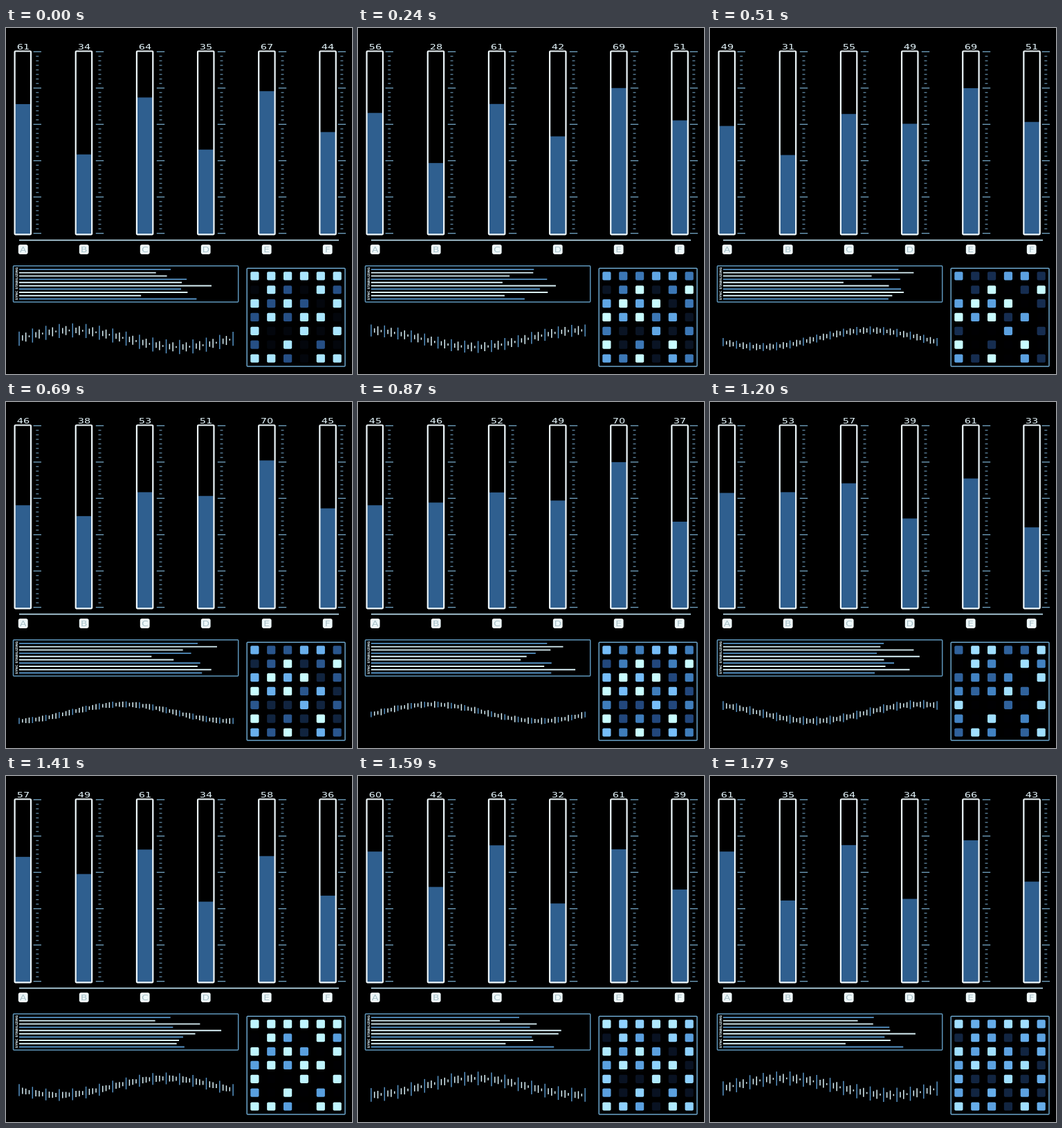
These frames come from a looping animation (500 px wide and 500 px high, 1800 ms). An HTML page with a canvas:

```html
<!DOCTYPE html>
<html lang="en">
<head>
<meta charset="utf-8">
<title>Control panel</title>
<style>
html, body { margin: 0; width: 100%; height: 100%; overflow: hidden; background: #000; }
canvas { display: block; width: 500px; height: 500px; }
</style>
</head>
<body>
<canvas id="stage" width="500" height="500"></canvas>
<script>
const ctx = document.getElementById('stage').getContext('2d');
const LOOP = 1800, STEP = 30;
const FACE = '"DejaVu Sans", Inter, sans-serif';
const BLUE = '#5592c4', PALE = '#d9f1f8';

// Every moving length is a cosine: mean, swing, time of its peak in ms, cycles per loop.
const wave = (t, mean, swing, peak, cycles = 1) =>
  mean + swing * Math.cos(2 * Math.PI * cycles * (t - peak) / LOOP);

const GAUGES = [
  t => wave(t, 53, 8, 1680),
  t => wave(t, 40.3, 12.4, 1160),
  t => wave(t, 58.3, 6.1, 1690),
  t => wave(t, 41.3, 9.3, 650),
  t => wave(t, 65.7, 5.5, 480) + wave(t, 0, 2.3, 900, 2),
  t => wave(t, 41.9, 9.5, 300) + wave(t, 0, 1.7, 450, 2)
];

const LINES = [
  [255, 22, 700], [255, 50, 700], [257, 38, 1150], [258, 18, 400], [252, 60, 1360],
  [266, 31, 1790], [266, 15, 750], [265, 15, 500], [255, 60, 920], [262, 24, 760, 2]
];

// Heights of the four ticks that repeat along the sine.
const TICKS = [[14.3, 6.2, 1730], [7, 2, 1480], [9, 4.3, 100], [6, 3.5, 950]];

// Four groups of cells, each flickering between a few brightness levels.
const CELLS = ['XYYXXY', 'NYZNYZ', 'XZXZNY', 'ZXZYXN', 'YNNXNY', 'ZNYNZN', 'XYZNXY'];
const BEATS = [0, 240, 510, 870, 1200, 1410, 1770, LOOP];
const LEVELS = {
  X: [0.9, 0.62, 0.6, 0.72, 0.35, 0.97, 0.87],
  Y: [0.9, 0.43, 0.16, 0.45, 0.87, 0.97, 0.65],
  Z: [0.28, 1, 1, 1, 0.47, 0.59, 0.6],
  N: [0.02, 0.07, 0, 0.25, 0, 0, 0.13]
};
const RAMP = [[0, 0, 2], [34, 71, 124], [70, 138, 203], [124, 196, 255], [200, 252, 255]];

const mix = (a, b, u) => a + (b - a) * u;

function level(list, t) {
  const i = BEATS.findIndex(b => b > t) - 1;
  const u = (t - BEATS[i]) / (BEATS[i + 1] - BEATS[i]);
  return mix(list[i], list[(i + 1) % list.length], u);
}

function shade(v) {
  const at = v * (RAMP.length - 1);
  const i = Math.min(Math.floor(at), RAMP.length - 2);
  return `rgb(${RAMP[i].map((c, k) => Math.round(mix(c, RAMP[i + 1][k], at - i)))})`;
}

function line(x1, y1, x2, y2, color, width) {
  ctx.strokeStyle = color;
  ctx.lineWidth = width;
  ctx.beginPath();
  ctx.moveTo(x1, y1);
  ctx.lineTo(x2, y2);
  ctx.stroke();
}

function frame(x, y, w, h, color, width) {
  ctx.strokeStyle = color;
  ctx.lineWidth = width;
  ctx.beginPath();
  ctx.roundRect(x, y, w, h, 1);
  ctx.stroke();
}

function tile(x, y, size, r, color) {
  ctx.fillStyle = color;
  ctx.beginPath();
  ctx.roundRect(x - size / 2, y - size / 2, size, size, r);
  ctx.fill();
}

function label(text, x, y, font, color, wide = 1, turn = 0) {
  ctx.save();
  ctx.translate(x, y);
  ctx.rotate(turn);
  ctx.scale(wide, 1);
  ctx.font = `${font} ${FACE}`;
  ctx.fillStyle = color;
  ctx.textAlign = 'center';
  ctx.fillText(text, 0, 0);
  ctx.restore();
}

function drawGauge(gauge, n, t) {
  const x = 24.3 + n * 88.15, mid = 24.7 + n * 88;
  const ruler = mid + (n % 5 ? 22.8 : 20.6);
  const top = 268.6 - 2.63 * gauge(t);
  ctx.fillStyle = '#2f5f8f';
  ctx.fillRect(x - 11, top, 22, 298 - top);
  frame(x - 11.7, 33.5, 23.4, 264.8, '#eef8fc', 2.2);

  for (let k = 0; k <= 40; k++) {
    const half = k % 8 ? 2 : 5.7;
    const y = 34.3 + k * 6.56;
    line(ruler - half, y, ruler + half, y, k % 8 ? '#587f99' : '#6c9bb8', 1.4);
  }
  // The reading trails the fill by one step.
  label(Math.round(gauge(t - STEP)), mid + 0.2, 30.8, '10.5px', '#e4f5fb', 1.38);
  tile(mid, 320, 13.8, 2.8, '#eef9fb');
  label('ABCDEF'[n], mid, 323.6, '10px', '#a9c0c8', 1.38);
}

function drawSync(t) {
  frame(10.5, 343.7, 325.2, 52.3, '#5e96bb', 1.5);
  LINES.forEach((spec, n) => {
    const y = 348.9 + n * 4.73;
    line(19, y, wave(t, ...spec), y, n % 3 ? PALE : BLUE, 1.9);
  });
  label('SYNC STABILIZING', 17.3, 369.5, 'bold 4.6px', '#dff3fa', 1, -Math.PI / 2);
}

function drawSine(t) {
  for (let k = 0; k <= 64; k++) {
    const x = 19 + k * 4.83;
    const y = 449 - 12 * Math.sin(2 * Math.PI * ((x - 19) / 310 + 2 * t / LOOP));
    const half = wave(t, ...TICKS[k % 4]) / 2;
    line(x, y - half, x, y + half, k % 4 ? PALE : BLUE, 1.5);
  }
}

function drawMatrix(t) {
  frame(348.2, 347.2, 141.8, 141.8, '#6ba5cb', 1.5);
  CELLS.forEach((row, r) => [...row].forEach((key, c) =>
    tile(359.4 + c * 23.85, 358.4 + r * 19.85, 12.2, 1.8, shade(level(LEVELS[key], t)))));
}

function draw(now) {
  const t = Math.floor((now % LOOP) / STEP) * STEP;
  ctx.fillStyle = '#000';
  ctx.fillRect(0, 0, 500, 500);
  GAUGES.forEach((gauge, n) => drawGauge(gauge, n, t));
  line(19, 306.6, 481, 306.6, '#b5d8e8', 1.9);
  drawSync(t);
  drawSine(t);
  drawMatrix(t);
}

const start = performance.now();
function tick() {
  draw(performance.now() - start);
  requestAnimationFrame(tick);
}
tick();
</script>
</body>
</html>
```
